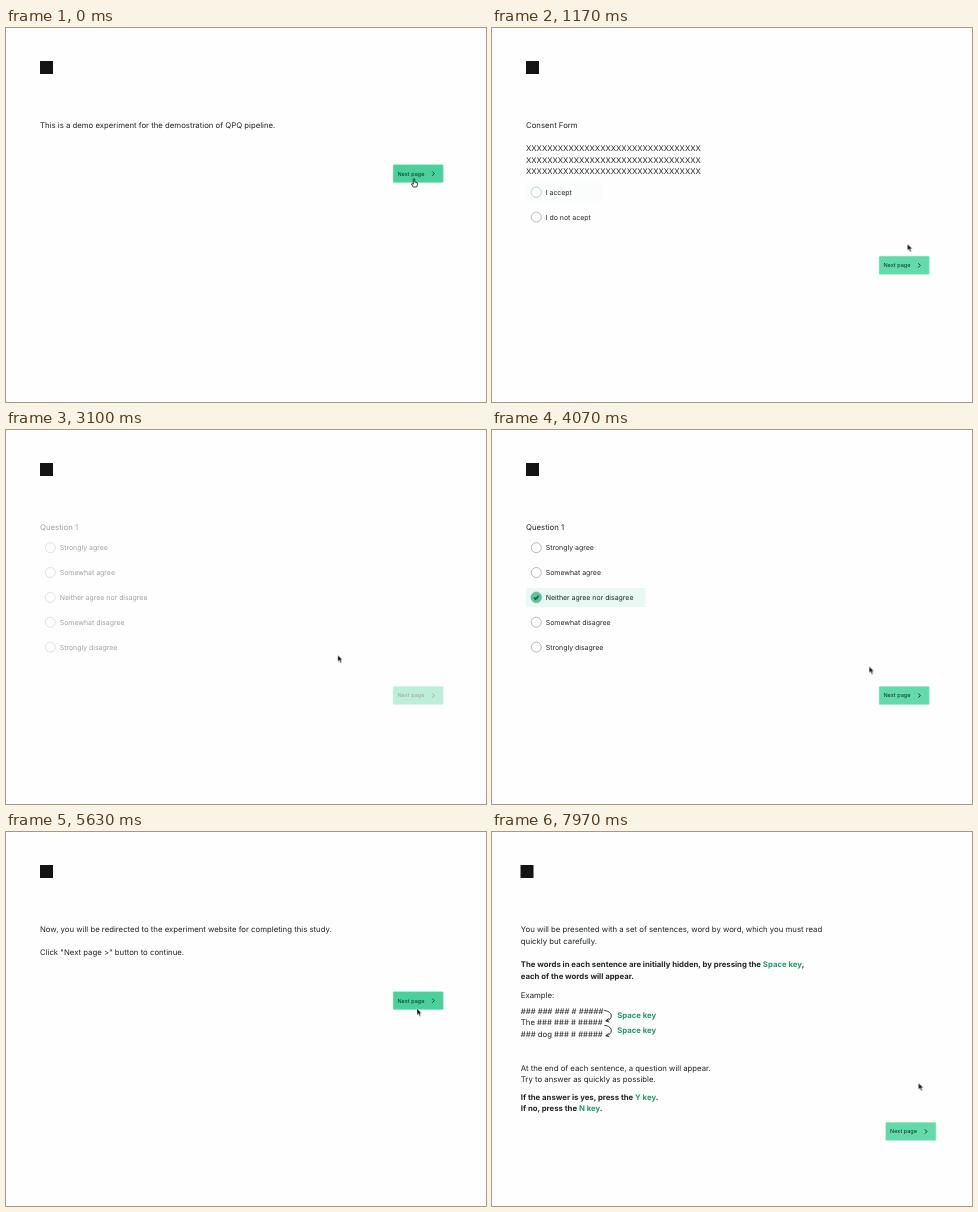
These frames come from a looping animation (480 by 374 pixels, 8 s). An HTML page:

```html
<!DOCTYPE html>
<html lang="en">
<head>
<meta charset="utf-8">
<title>Questionnaire demo</title>
<style>
html, body { margin: 0; width: 100%; height: 100%; overflow: hidden; background: #fefefe; }
svg { display: block; width: 480px; height: 374px; }
text { font: 7.78px Inter, sans-serif; fill: #1e2422; white-space: pre; text-rendering: geometricPrecision; }
.opt text { font-size: 6.95px; }
.dialog text { font: 7.48px "Liberation Sans", Arial, sans-serif; }
text.bold, .dialog text.bold { font-weight: 700; }
.key { fill: #209a66; font-weight: 700; }
#btn text { font-size: 5.55px; fill: #12302a; }
.radio { fill: #fefefe; stroke: #a0a5a3; stroke-width: .75; }
.line { fill: none; stroke: #1e2422; stroke-width: .9; }
.btn { fill: #63daaa; }
.over { fill: #49d09b; }

.page, .logo, .dialog, .hint, .picked, .arrow, .hand, .btn, .cursor {
  animation: 8s linear infinite;
}
.p0 { animation-name: p0; }
.p1 { animation-name: p1; }
.p2 { animation-name: p2; }
.p3 { animation-name: p3; }
.p4 { animation-name: p4; }
.logo { animation-name: logo; }
.dialog { animation-name: dialog; }
.hint1 { animation-name: hint1; }
.pick1 { animation-name: pick1; }
.hint2 { animation-name: hint2; }
.pick2 { animation-name: pick2; }
.b1 { animation-name: b1; }
.b2 { animation-name: b2; }
.b3 { animation-name: b3; }
.hand { animation-name: hand; animation-timing-function: step-end; }
.arrow { animation-name: arrow; animation-timing-function: step-end; }
.cursor { animation-name: move; animation-timing-function: ease-in-out; }

@keyframes p0 { 0%, 1% { opacity: 1 } 5%, 100% { opacity: 0 } }
@keyframes p1 { 0%, 10.8% { opacity: 0 } 13.5%, 32% { opacity: 1 } 35.5%, 100% { opacity: 0 } }
@keyframes p2 { 0%, 37.5% { opacity: 0 } 40.5%, 60.5% { opacity: 1 } 63.5%, 100% { opacity: 0 } }
@keyframes p3 { 0%, 64.5% { opacity: 0 } 67.5%, 71.5% { opacity: 1 } 72.8%, 100% { opacity: 0 } }
@keyframes p4 { 0%, 91% { opacity: 0 } 94%, 100% { opacity: 1 } }
@keyframes logo { 0%, 73.3% { opacity: 1 } 75.2%, 100% { opacity: 0 } }
@keyframes dialog { 0%, 79.2% { opacity: 0 } 80.8%, 90% { opacity: 1 } 90.5%, 100% { opacity: 0 } }
@keyframes hint1 { 0%, 13% { opacity: 0 } 14.2%, 22% { opacity: 1 } 23%, 100% { opacity: 0 } }
@keyframes pick1 { 0%, 21.6% { opacity: 0 } 22.8%, 100% { opacity: 1 } }
@keyframes hint2 { 0%, 42.8% { opacity: 0 } 43.8%, 45% { opacity: 1 } 46%, 100% { opacity: 0 } }
@keyframes pick2 { 0%, 44.6% { opacity: 0 } 45.8%, 100% { opacity: 1 } }
@keyframes b1 { 0%, 30% { fill: #63daaa } 31%, 100% { fill: #49d09b } }
@keyframes b2 { 0%, 52.2% { fill: #63daaa } 53%, 100% { fill: #49d09b } }
@keyframes b3 { 0%, 69.4% { fill: #63daaa } 70.2%, 100% { fill: #49d09b } }
@keyframes hand {
  0%, 19.5%, 30.6%, 43%, 52.8%, 71%, 85.8% { opacity: 1 }
  2.5%, 22.5%, 37%, 46%, 59%, 72.5%, 90.2%, 100% { opacity: 0 }
}
@keyframes arrow {
  0%, 19.5%, 30.6%, 43%, 52.8%, 71%, 85.8% { opacity: 0 }
  2.5%, 22.5%, 37%, 46%, 59%, 72.5%, 90.2%, 100% { opacity: 1 }
}
@keyframes move {
  0%, 1.25% { transform: translate(408px, 151px) }
  10.4% { transform: translate(415.5px, 218px) }
  14.6% { transform: translate(415.5px, 216px) }
  20%, 22% { transform: translate(58px, 164px) }
  29.6% { transform: translate(387.3px, 224.3px) }
  31.25%, 36.5% { transform: translate(401px, 240px) }
  43.75%, 45.6% { transform: translate(60px, 167px) }
  50.9% { transform: translate(377.2px, 236.5px) }
  53.2%, 58.5% { transform: translate(404px, 270px) }
  63% { transform: translate(408px, 225px) }
  67.5% { transform: translate(411px, 190px) }
  70.4% { transform: translate(411px, 176.5px) }
  71.2%, 72.8% { transform: translate(411px, 173px) }
  75.3%, 83.7% { transform: translate(412.5px, 214px) }
  85.4% { transform: translate(328.5px, 239px) }
  86.3%, 90% { transform: translate(325px, 254px) }
  99.5%, 100% { transform: translate(426.5px, 251px) }
}
</style>
</head>
<body>
<svg viewBox="0 0 480 374">
  <defs>
    <g id="btn">
      <rect width="50.4" height="18.4" rx="1.2" stroke="#c4f1df" stroke-width=".5"/>
      <text x="4.4" y="11.2">Next page</text>
      <path class="line" d="M39.3 7.2l2 2.1-2 2.1"/>
    </g>
    <g id="tick">
      <circle r="5" fill="#55cd9d" stroke="#4f9c80" stroke-width=".7"/>
      <path d="M-2.4 .1l1.7 1.8 3.1-3.5" fill="none" stroke="#10231d" stroke-width="1.2"/>
    </g>
    <g id="hop">
      <path class="line" d="M0 0C9 .5 9 9 2 10.2M4.4 7.8L1.4 10.4l3.6 1"/>
    </g>
  </defs>

  <rect class="logo" x="34" y="33" width="13" height="13" fill="#141414"/>

  <g class="page p0">
    <text x="34" y="100">This is a demo experiment for the demostration of QPQ pipeline.</text>
    <use class="over" href="#btn" x="387" y="136.4"/>
  </g>

  <g class="page p1">
    <text x="34" y="100">Consent Form</text>
    <text x="34" y="123">XXXXXXXXXXXXXXXXXXXXXXXXXXXXXXXXX</text>
    <text x="34" y="134.7">XXXXXXXXXXXXXXXXXXXXXXXXXXXXXXXXX</text>
    <text x="34" y="146.4">XXXXXXXXXXXXXXXXXXXXXXXXXXXXXXXXX</text>
    <rect class="hint hint1" x="34.3" y="154.6" width="76" height="19" fill="#fafdfc"/>
    <rect class="picked pick1" x="34.3" y="154.6" width="76" height="19" fill="#e8f8f2"/>
    <g class="opt">
      <circle class="radio" cx="44.3" cy="164.2" r="5"/>
      <text x="53.7" y="166.7">I accept</text>
      <circle class="radio" cx="44.3" cy="189.1" r="5"/>
      <text x="53.7" y="191.6">I do not acept</text>
    </g>
    <circle class="hint hint1" cx="44.3" cy="164.2" r="5" fill="#fafdfc" stroke="#b4e6d2" stroke-width=".9"/>
    <use class="picked pick1" href="#tick" x="44.3" y="164.2"/>
    <use class="btn b1" href="#btn" x="387" y="228.1"/>
  </g>

  <g class="page p2">
    <text x="34" y="100">Question 1</text>
    <rect class="hint hint2" x="34.3" y="158" width="119.2" height="19" fill="#fafdfc"/>
    <rect class="picked pick2" x="34.3" y="158" width="119.2" height="19" fill="#e8f8f2"/>
    <g class="opt">
      <circle class="radio" cx="44.3" cy="117.7" r="5"/>
      <text x="53.7" y="120.2">Strongly agree</text>
      <circle class="radio" cx="44.3" cy="142.5" r="5"/>
      <text x="53.7" y="145">Somewhat agree</text>
      <circle class="radio" cx="44.3" cy="167.4" r="5"/>
      <text x="53.7" y="169.9">Neither agree nor disagree</text>
      <circle class="radio" cx="44.3" cy="192.2" r="5"/>
      <text x="53.7" y="194.7">Somewhat disagree</text>
      <circle class="radio" cx="44.3" cy="217.1" r="5"/>
      <text x="53.7" y="219.6">Strongly disagree</text>
    </g>
    <use class="picked pick2" href="#tick" x="44.3" y="167.4"/>
    <use class="btn b2" href="#btn" x="387" y="256.3"/>
  </g>

  <g class="page p3">
    <text x="34" y="100">Now, you will be redirected to the experiment website for completing this study.</text>
    <text x="34" y="123">Click "Next page &gt;" button to continue.</text>
    <use class="btn b3" href="#btn" x="387" y="159.4"/>
  </g>

  <g class="dialog">
    <rect x="111" y="165.5" width="239" height="108" rx="1.5" fill="#fefefe" stroke="#c8c8c8" stroke-width=".9"/>
    <rect x="113.5" y="167.5" width="234.5" height="16" rx="1" fill="#047804"/>
    <text class="bold" x="121" y="177.8" style="fill:#083808">tidalpoll_connection</text>
    <rect x="336.2" y="170.4" width="9.6" height="10" rx="1" fill="#f6f6f6" stroke="#c5c5c5" stroke-width=".6"/>
    <path d="M339.2 173.6l3.6 3.6m0-3.6l-3.6 3.6" stroke="#222" stroke-width="1.1"/>
    <path d="M120.5 199H341" stroke="#9a9a9a" stroke-width=".9"/>
    <text x="120.6" y="213.7">all resources downloaded.</text>
    <rect x="120.8" y="219.9" width="220" height="15.3" rx="1.5" fill="#e5e5e5" stroke="#c6c6c6" stroke-width=".8"/>
    <path d="M113.5 243.3H348" stroke="#d4d4d4" stroke-width=".8"/>
    <rect x="269.5" y="249.4" width="39.3" height="15" rx="1.5" fill="#f4f6f6" stroke="#c5c9c9" stroke-width=".8"/>
    <text x="277.4" y="259.5">Cancel</text>
    <rect x="312.6" y="249.4" width="24.6" height="15" rx="1.5" fill="#e5edef" stroke="#2b5c70" stroke-width="1.1"/>
    <text x="320" y="259.5">Ok</text>
  </g>

  <g class="page p4">
    <rect x="28.5" y="33" width="13" height="13" fill="#141414"/>
    <text x="28.8" y="100.2">You will be presented with a set of sentences, word by word, which you must read</text>
    <text x="28.8" y="111.8">quickly but carefully.</text>
    <text class="bold" x="28.8" y="135.1">The words in each sentence are initially hidden, by pressing the <tspan class="key">Space key</tspan>,</text>
    <text class="bold" x="28.8" y="146.7">each of the words will appear.</text>
    <text x="28.8" y="166.4">Example:</text>
    <text x="28.8" y="181.7">### ### ### # #####</text>
    <text x="28.8" y="193.3">The ### ### # #####</text>
    <text x="28.8" y="204.9">### dog ### # #####</text>
    <use href="#hop" x="112.3" y="178.6"/>
    <use href="#hop" x="112.3" y="193.4"/>
    <text class="key" x="125.2" y="186.3">Space key</text>
    <text class="key" x="125.2" y="201.1">Space key</text>
    <text x="28.8" y="238.7">At the end of each sentence, a question will appear.</text>
    <text x="28.8" y="250.1">Try to answer as quickly as possible.</text>
    <text class="bold" x="28.8" y="267.7">If the answer is yes, press the <tspan class="key">Y key</tspan>.</text>
    <text class="bold" x="28.8" y="279.1">If no, press the <tspan class="key">N key</tspan>.</text>
    <use class="btn" href="#btn" x="393.6" y="290.2"/>
  </g>

  <g class="cursor" stroke-linejoin="round">
    <path class="arrow" d="M0 0v6.4l1.5-1.3 1.2 2.7 1.2-.5-1.2-2.6h2z" fill="#0b0b0b" stroke="#fff" stroke-width=".4"/>
    <path class="hand" d="M-.7 0Q0-.9.7 0V3L3.4 3.8V6L2.6 8H-.8L-2.6 5Q-2.4 4-.7 5.2Z" fill="#fff" stroke="#111" stroke-width=".8"/>
  </g>
</svg>
</body>
</html>
```
